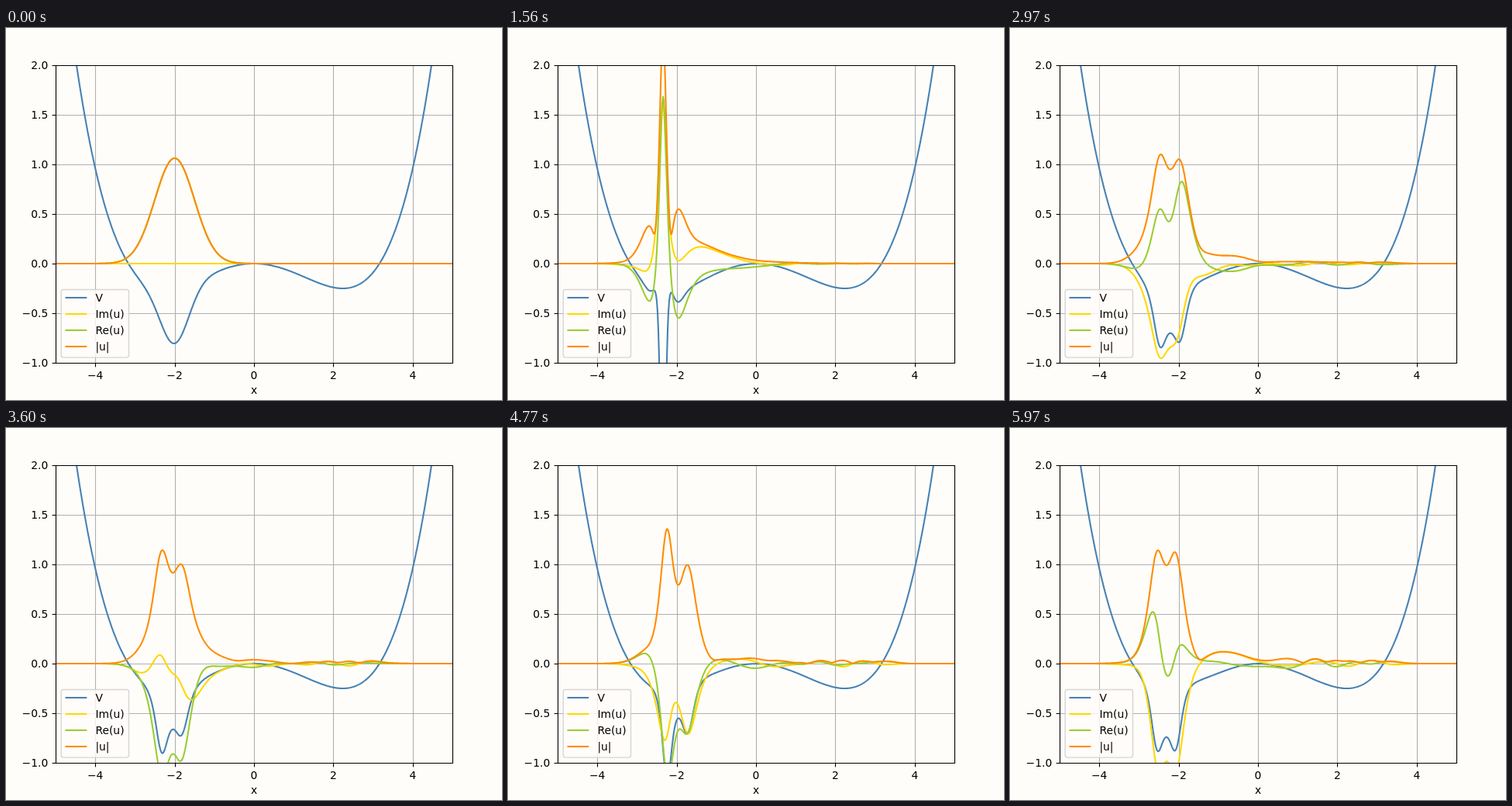
An HTML page with a canvas for the animation above (6 s loop, 640 by 480 pixels).

```html
<!DOCTYPE html>
<html lang="en">
<head>
<meta charset="utf-8">
<title>Nonlinear wave packet in a double well</title>
<style>
  html, body { margin: 0; width: 640px; height: 480px; overflow: hidden; background: #fffdfa; }
  canvas { display: block; }
</style>
</head>
<body>
<canvas id="plot" width="640" height="480"></canvas>
<script>
// Split-step solution of  i u_t = -D u_xx + V u,  V = V0(x) - G |u|^2
const N = 512, LENGTH = 10, D = 0.01, G = 0.5;
const FRAMES = 200, FRAME_MS = 30, FRAME_TIME = 0.5, SUBSTEPS = 50;
const dt = FRAME_TIME / SUBSTEPS;

const gridX = i => -LENGTH / 2 + i * LENGTH / N;
const well = x => 0.01 * x ** 4 - 0.1 * x * x;

const re = new Float64Array(N), im = new Float64Array(N);
const v0 = re.map((_, i) => well(gridX(i)));
for (let i = 0; i < N; i++) re[i] = (4 / Math.PI) ** 0.25 * Math.exp(-2 * (gridX(i) + 2) ** 2);

const kinetic = re.map((_, i) => {
  const k = 2 * Math.PI * (i < N / 2 ? i : i - N) / LENGTH;
  return D * k * k * dt;
});
const kinCos = kinetic.map(Math.cos), kinSin = kinetic.map(Math.sin);
const twCos = re.map((_, i) => Math.cos(2 * Math.PI * i / N));
const twSin = re.map((_, i) => -Math.sin(2 * Math.PI * i / N));

// In-place radix-2 transform; swapping the arguments gives the inverse times N
function fft(a, b) {
  for (let i = 1, j = 0; i < N; i++) {
    let bit = N >> 1;
    for (; j & bit; bit >>= 1) j ^= bit;
    j ^= bit;
    if (i < j) {
      let t = a[i]; a[i] = a[j]; a[j] = t;
      t = b[i]; b[i] = b[j]; b[j] = t;
    }
  }
  for (let half = 1; half < N; half *= 2) {
    const stride = N / (2 * half);
    for (let start = 0; start < N; start += 2 * half) {
      for (let j = 0; j < half; j++) {
        const p = start + j, q = p + half;
        const c = twCos[j * stride], s = twSin[j * stride];
        const x = a[q] * c - b[q] * s, y = a[q] * s + b[q] * c;
        a[q] = a[p] - x; b[q] = b[p] - y;
        a[p] += x; b[p] += y;
      }
    }
  }
}

function rotate(i, c, s, scale) {
  const x = re[i], y = im[i];
  re[i] = (x * c + y * s) * scale;
  im[i] = (y * c - x * s) * scale;
}

function potentialStep(h) {
  for (let i = 0; i < N; i++) {
    const angle = h * (v0[i] - G * (re[i] * re[i] + im[i] * im[i]));
    rotate(i, Math.cos(angle), Math.sin(angle), 1);
  }
}

function kineticStep() {
  fft(re, im);
  for (let i = 0; i < N; i++) rotate(i, kinCos[i], kinSin[i], 1 / N);
  fft(im, re);
}

function advance() {
  potentialStep(dt / 2);
  for (let n = 1; n <= SUBSTEPS; n++) {
    kineticStep();
    potentialStep(n < SUBSTEPS ? dt : dt / 2);
  }
}

const states = [];
function stateAt(frame) {
  while (states.length <= frame) {
    if (states.length) advance();
    states.push({ re: re.slice(), im: im.slice() });
  }
  return states[frame];
}

// Plot
const ctx = document.getElementById('plot').getContext('2d');
const LEFT = 64, RIGHT = 576, TOP = 48, BOTTOM = 432;
const px = x => 320 + 51.2 * x;
const py = y => 304 - 128 * y;
const snap = v => Math.round(v) + 0.5;
const label = (v, digits) => v.toFixed(digits).replace('-', '\u2212');
const xTicks = [-4, -2, 0, 2, 4];
const yTicks = [-1, -0.5, 0, 0.5, 1, 1.5, 2];
const legend = [['V', '#4682b4'], ['Im(u)', '#ffd700'], ['Re(u)', '#9acd32'], ['|u|', '#ff8c00']];

function line(x1, y1, x2, y2, color, width) {
  ctx.strokeStyle = color;
  ctx.lineWidth = width;
  ctx.beginPath();
  ctx.moveTo(x1, y1);
  ctx.lineTo(x2, y2);
  ctx.stroke();
}

function text(str, x, y, align) {
  ctx.fillStyle = '#000';
  ctx.textAlign = align;
  ctx.fillText(str, x, y);
}

function curve(f, color) {
  ctx.strokeStyle = color;
  ctx.lineWidth = 2.08;
  ctx.beginPath();
  for (let i = 0; i <= N; i++) ctx.lineTo(px(gridX(i)), py(f(i % N)));
  ctx.stroke();
}

function drawGrid() {
  for (const x of xTicks) line(snap(px(x)), TOP, snap(px(x)), BOTTOM, '#b0b0b0', 1.11);
  for (const y of yTicks) line(LEFT, snap(py(y)), RIGHT, snap(py(y)), '#b0b0b0', 1.11);
}

function drawAxes() {
  for (const x of xTicks) {
    line(snap(px(x)), BOTTOM + 0.5, snap(px(x)), BOTTOM + 5.4, '#000', 1.11);
    text(label(x, 0), px(x), 453, 'center');
  }
  for (const y of yTicks) {
    line(LEFT - 4.4, snap(py(y)), LEFT + 0.5, snap(py(y)), '#000', 1.11);
    text(label(y, 1), 54.3, py(y) + 5, 'right');
  }
  ctx.strokeStyle = '#000';
  ctx.lineWidth = 1.11;
  ctx.strokeRect(LEFT + 0.5, TOP + 0.5, RIGHT - LEFT, BOTTOM - TOP);
  text('x', 320, 472, 'center');
}

function drawLegend() {
  ctx.beginPath();
  ctx.roundRect(71.2, 337.5, 87.3, 87.6, 2.8);
  ctx.fillStyle = 'rgba(255,253,250,0.8)';
  ctx.fill();
  ctx.strokeStyle = 'rgba(204,204,204,0.8)';
  ctx.lineWidth = 1.39;
  ctx.stroke();
  legend.forEach(([name, color], i) => {
    const y = 348 + 21 * i;
    line(76.5, y, 104.3, y, color, 2.08);
    text(name, 115.4, y + 5, 'left');
  });
}

function draw(frame) {
  const u = stateAt(frame);
  const abs = i => Math.hypot(u.re[i], u.im[i]);
  const curves = [i => v0[i] - G * abs(i) ** 2, i => u.im[i], i => u.re[i], abs];

  ctx.fillStyle = '#fffdfa';
  ctx.fillRect(0, 0, 640, 480);
  ctx.font = '13.89px "DejaVu Sans", sans-serif';
  ctx.lineJoin = 'round';
  drawGrid();
  ctx.save();
  ctx.beginPath();
  ctx.rect(LEFT, TOP, RIGHT - LEFT, BOTTOM - TOP);
  ctx.clip();
  curves.forEach((f, i) => curve(f, legend[i][1]));
  ctx.restore();
  drawAxes();
  drawLegend();
}

let shown = -1;
function tick() {
  const frame = Math.floor(performance.now() / FRAME_MS) % FRAMES;
  if (frame !== shown) draw(shown = frame);
  requestAnimationFrame(tick);
}
tick();
</script>
</body>
</html>
```
